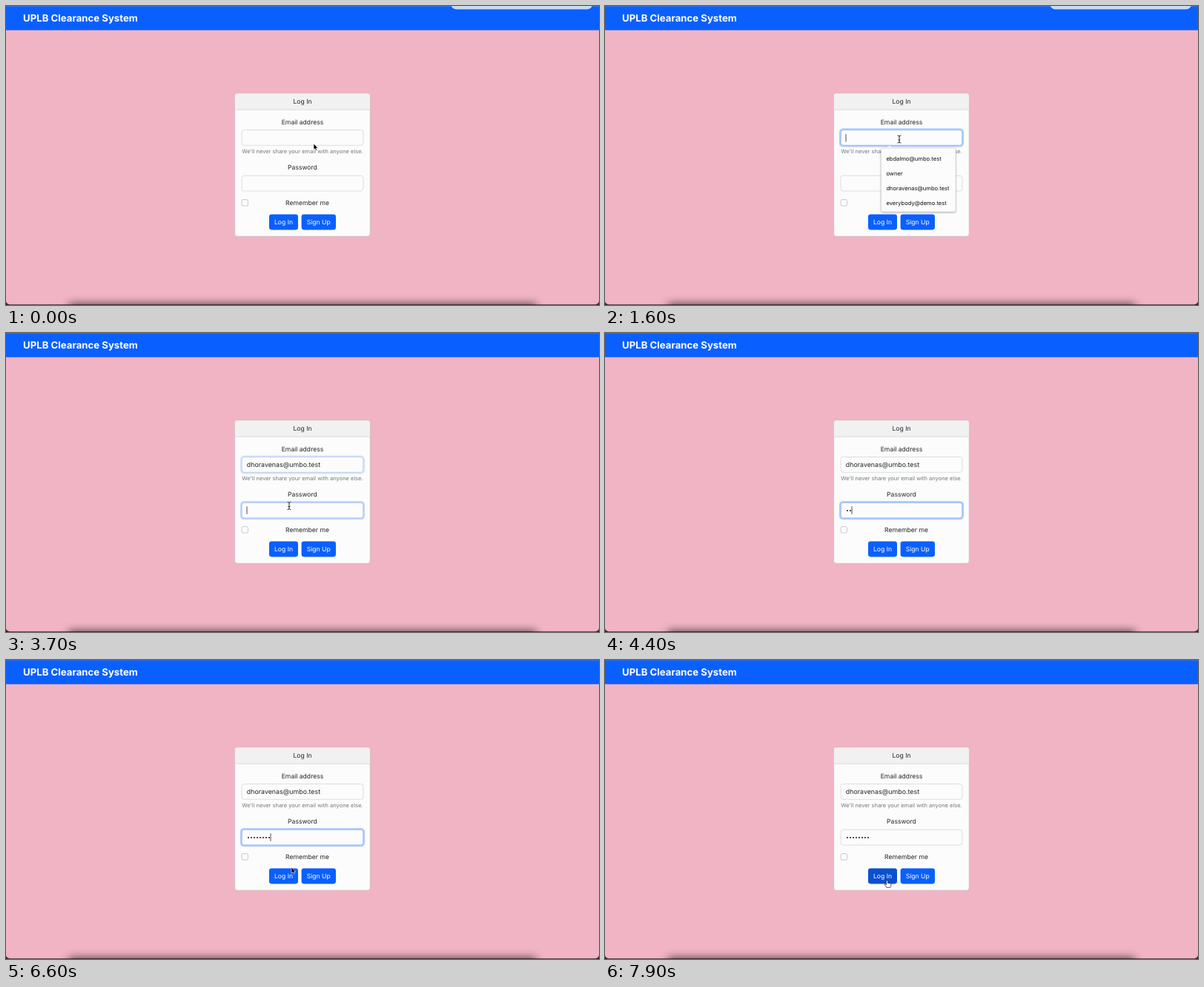
Animation, 800 px wide and 404 px high, one loop 8000 ms. Source, as an HTML page:

```html
<!DOCTYPE html>
<html lang="en">
<head>
<meta charset="utf-8">
<title>Log In</title>
<style>
  html, body { margin: 0; width: 100%; height: 100%; overflow: hidden; background: #33282d; }
  svg { display: block; width: 100%; height: 100%; }
  text { font: 8.6px Inter, sans-serif; fill: #212529; text-rendering: geometricPrecision; }
  .mid { text-anchor: middle; }
  .brand { font-size: 13.2px; font-weight: 700; fill: #fff; }
  .help { font-size: 7.5px; fill: #75797e; }
  .value { font-size: 8.85px; }
  .menu text { font-size: 7.6px; fill: #111; }
  .button { fill: #fff; }
  .box { fill: #fcfcfc; stroke: #d3d6da; stroke-width: .8; }
  .glow { fill: none; stroke: #b4ceff; stroke-width: 2.3; }
  .ring { fill: none; stroke: #86b2fb; stroke-width: .8; }
  .caret { stroke: #222; stroke-width: .8; }
</style>
</head>
<body>
<svg viewBox="0 0 800 404" preserveAspectRatio="none">
  <defs>
    <filter id="dockBlur" x="-10%" y="-100%" width="120%" height="300%"><feGaussianBlur stdDeviation="6"/></filter>
    <filter id="menuBlur" x="-20%" y="-20%" width="140%" height="140%"><feGaussianBlur stdDeviation="1.6"/></filter>
  </defs>

  <rect y="-10" width="800" height="413.3" rx="5" fill="#f0b4c4"/>
  <rect width="800" height="32.7" fill="#0a60fe"/>
  <rect width="800" height=".7" fill="#4f7bc4"/>
  <text class="brand" x="23" y="20.7">UPLB Clearance System</text>
  <rect id="notice" x="600.5" y="-20" width="190.5" height="24.5" rx="7" fill="#c9dcf0"/>
  <rect x="85" y="402" width="630" height="40" fill="#000" opacity=".62" filter="url(#dockBlur)"/>

  <rect x="308.6" y="118" width="182.6" height="193.2" rx="3.3" fill="#fcfcfc" stroke="#cdb9bf" stroke-width=".7"/>
  <path d="M309 140V121.5Q309 118.4 312 118.4H487.8Q490.8 118.4 490.8 121.5V140Z" fill="#f1f1f1"/>
  <path d="M309 140.2H490.8" stroke="#cfcfcf" stroke-width=".7"/>
  <text class="mid" x="400" y="132.2">Log In</text>
  <text class="mid" x="400" y="159.5">Email address</text>
  <text class="help mid" x="400" y="199.3">We'll never share your email with anyone else.</text>
  <text class="mid" x="400" y="221.2">Password</text>
  <text class="mid" x="406.6" y="269">Remember me</text>
  <rect class="box" x="318" y="261.6" width="8.5" height="8.5" rx="2" style="stroke:#b9bcc0"/>

  <rect class="box" x="318" y="167.5" width="164" height="20.8" rx="3.3"/>
  <g id="emailFocus">
    <rect class="glow" x="317" y="166.4" width="166" height="23" rx="4"/>
    <rect class="ring" x="318" y="167.5" width="164" height="20.8" rx="3.3"/>
  </g>
  <text class="value" id="email" x="324.8" y="181.1">dhoravenas@umbo.test</text>
  <path class="caret" id="emailCaret" d="M0 173V183.5"/>

  <rect class="box" x="318" y="229.2" width="164" height="20.8" rx="3.3"/>
  <g id="passwordFocus">
    <rect class="glow" x="317" y="228.1" width="166" height="23" rx="4"/>
    <rect class="ring" x="318" y="229.2" width="164" height="20.8" rx="3.3"/>
  </g>
  <g id="dots" fill="#212529"></g>
  <path class="caret" id="passwordCaret" d="M0 234.3V244.8"/>

  <rect id="login" x="355" y="281.4" width="39" height="21" rx="3.3"/>
  <text class="button mid" x="374.5" y="295.1">Log In</text>
  <rect x="398.6" y="281.4" width="46.4" height="21" rx="3.3" fill="#0a60fe"/>
  <text class="button mid" x="421.7" y="295.1">Sign Up</text>

  <g id="menu" class="menu">
    <rect x="372.5" y="193" width="100.5" height="86" rx="2" opacity=".35" filter="url(#menuBlur)"/>
    <path d="M379.5 193L384 188.6 388.5 193Z" fill="#fcfcfc"/>
    <rect x="372.5" y="192" width="100.5" height="86" rx="2" fill="#fcfcfc" stroke="#cfcfcf" stroke-width=".5"/>
    <rect id="hover" x="372.8" width="99.9" height="20" fill="#e6e6e6"/>
    <text x="379.4" y="208.6">ebdalmo@umbo.test</text>
    <text x="379.4" y="228.6">owner</text>
    <text x="379.4" y="248.6">dhoravenas@umbo.test</text>
    <text x="379.4" y="268.6">everybody@demo.test</text>
  </g>

  <g id="cursor">
    <path id="arrow" d="M0 0V8.2L1.9 6.5 3.2 9.3 4.5 8.7 3.3 6H5.9Z" fill="#000" stroke="#fff" stroke-width=".6"/>
    <g id="beam" fill="none" stroke-linecap="round">
      <path d="M-2-5Q0-5 0-3.8Q0-5 2-5M0-3.8V3.8M-2 5Q0 5 0 3.8Q0 5 2 5M-1 1H1" stroke="#fff" stroke-width="1.8" opacity=".6"/>
      <path d="M-2-5Q0-5 0-3.8Q0-5 2-5M0-3.8V3.8M-2 5Q0 5 0 3.8Q0 5 2 5M-1 1H1" stroke="#111" stroke-width=".9"/>
    </g>
    <path id="hand" d="M-1 5V.6Q0-.8 1 .6V3.6Q2 2.8 2.7 3.8Q3.7 3.1 4.2 4.2Q5.4 3.8 5.4 5.2Q5.5 7.4 4.2 9.4H-.5Q-1.6 7.5-3.2 5.8Q-3.4 4.4-2.2 4.7L-1 5.8Z" fill="#fff" stroke="#111" stroke-width=".7" stroke-linejoin="round"/>
  </g>
</svg>

<script>
const LOOP = 8000, STEP = 100, DOTS = 8, DOT_WIDTH = 4, TEXT_LEFT = 325;
const $ = id => document.getElementById(id);
const clamp = v => Math.min(1, Math.max(0, v));
const between = (t, from, to) => t >= from && t < to;
const fade = (t, start, length = 150) => {
  const p = clamp((t - start) / length);
  return p * p * (3 - 2 * p);
};
const show = (id, on) => $(id).style.display = on ? "" : "none";

// time, x, y of the pointer's hot spot
const pointerPath = [
  [0, 415, 186], [100, 415, 185], [200, 415, 183], [800, 415, 183],
  [1200, 397, 180], [1700, 397, 180], [2150, 394, 246], [2300, 394, 246],
  [2500, 392, 195], [2800, 392, 195], [3100, 383, 228], [3200, 383, 228],
  [3400, 382, 233.5], [5900, 382, 233.5], [6600, 385, 280], [6900, 385, 280],
  [7200, 380.5, 298], [8000, 380.5, 298]
];

// pointer shape from each time on
const pointerShapes = [
  [0, "arrow"], [200, "beam"], [1800, "arrow"], [2400, "beam"],
  [4200, ""], [6000, "beam"], [6200, "arrow"], [7000, "hand"]
];

$("dots").innerHTML = Array.from({ length: DOTS }, (_, i) =>
  `<circle cx="${TEXT_LEFT + 2 + i * DOT_WIDTH}" cy="240" r="1.05"/>`).join("");

function pointerAt(t) {
  const next = Math.max(1, pointerPath.findIndex(key => key[0] > t));
  const [t0, x0, y0] = pointerPath[next - 1], [t1, x1, y1] = pointerPath[next];
  const p = (t - t0) / (t1 - t0);
  return [x0 + (x1 - x0) * p, y0 + (y1 - y0) * p];
}

function drawPointer(t) {
  const [x, y] = pointerAt(t);
  $("cursor").setAttribute("transform", `translate(${x} ${y})`);
  const shape = pointerShapes.findLast(([from]) => from <= t)[1];
  for (const id of ["arrow", "beam", "hand"]) show(id, id === shape);
  return y;
}

function draw(t) {
  const pointerY = drawPointer(t);

  const away = clamp((t - 2770) / 330);
  $("notice").setAttribute("transform", `translate(${210 * away ** 2} 0)`);
  show("notice", away < 1);

  const filled = t >= 2300;
  $("emailFocus").style.opacity = fade(t, 1200) - fade(t, 3620);
  show("email", filled);
  show("emailCaret", between(t, 1200, 2800) || between(t, 3300, 3700));
  $("emailCaret").setAttribute("transform",
    `translate(${filled ? TEXT_LEFT + $("email").getComputedTextLength() + .3 : TEXT_LEFT} 0)`);

  $("menu").style.opacity = fade(t, 1300, 100) - fade(t, 2250);
  const row = Math.floor((pointerY - 196) / 20);
  show("hover", between(t, 1800, 2400) && row >= 0);
  $("hover").setAttribute("y", 196 + row * 20);

  const typed = Math.min(DOTS, Math.max(0, Math.floor((t - 4000) / 200)));
  $("passwordFocus").style.opacity = fade(t, 3600) - fade(t, 7350);
  [...$("dots").children].forEach((dot, i) => dot.style.display = i < typed ? "" : "none");
  show("passwordCaret", between(t, 3700, 7400));
  $("passwordCaret").setAttribute("transform", `translate(${TEXT_LEFT + typed * DOT_WIDTH} 0)`);

  const hover = fade(t, 6970);
  $("login").setAttribute("fill", `rgb(10 ${96 - 16 * hover} ${254 - 46 * hover})`);
}

function tick(now) {
  draw(Math.floor((now % LOOP) / STEP) * STEP);
  requestAnimationFrame(tick);
}
tick(0);
</script>
</body>
</html>
```
